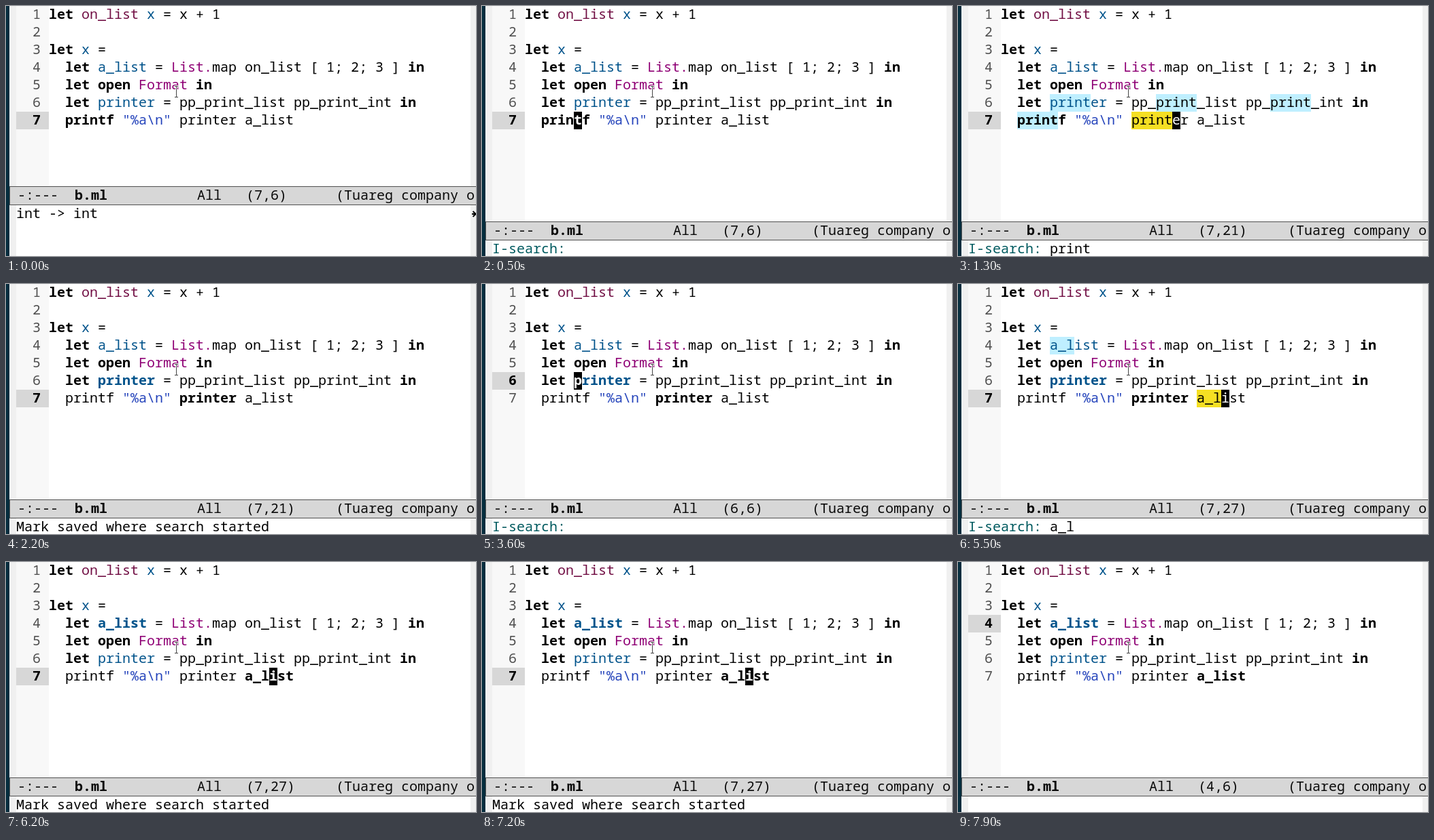
These frames come from a looping animation (691 px wide and 369 px high, 8 s). An HTML page with a canvas:

```html
<!DOCTYPE html>
<html lang="en">
<head>
<meta charset="utf-8">
<title>Editor search</title>
<style>
  html, body { margin: 0; width: 100%; height: 100%; overflow: hidden; background: #fff; }
  canvas { display: block; }
</style>
</head>
<body>
<canvas id="stage" width="691" height="369"></canvas>
<script>
const ctx = document.getElementById('stage').getContext('2d');
const LOOP = 8000, CELL = 12, ROW = 26, BASELINE = 19, LEFT = 15, CODE_X = 63;
const FONT = '20px "Noto Sans Mono", "DejaVu Sans Mono", monospace';

const lines = [
  'let on_list x = x + 1',
  '',
  'let x =',
  '  let a_list = List.map on_list [ 1; 2; 3 ] in',
  '  let open Format in',
  '  let printer = pp_print_list pp_print_int in',
  '  printf "%a\\n" printer a_list',
];

// Syntax rules: pattern and the style it gives
const syntax = [
  [/\b(let|open|in)\b/g, { bold: true }],
  [/(?<=let )(?!o)\w+|x(?= = x)/g, { color: '#00538b' }],
  [/on_list(?= x)/g, { color: '#721045' }],
  [/List\.|Format/g, { color: '#8f0075' }],
  [/".*"/g, { color: '#2544bb' }],
];

// Each step changes some fields of the state; row counts from 1.
// symbol: word shown in bold, query: null when no search is active
const steps = [
  [0, { row: 7, col: 6, cursor: false, symbol: 'printf', query: null, message: 'int -> int', tall: true }],
  [400, { cursor: true, message: '', tall: false }],
  [500, { query: '' }],
  [800, { query: 'p', col: 17 }],
  [1000, { query: 'pr', col: 18 }],
  [1100, { query: 'pri', col: 19 }],
  [1300, { query: 'print', col: 21 }],
  [1700, { query: null, message: 'Mark saved where search started' }],
  [2200, { symbol: 'printer', cursor: false }],
  [2400, { message: '' }],
  [2600, { row: 6, col: 6, cursor: true }],
  [3100, { cursor: false }],
  [3600, { cursor: true, query: '' }],
  [4100, { cursor: false }],
  [4600, { cursor: true }],
  [5000, { row: 7, col: 12, query: 'a' }],
  [5200, { col: 26, query: 'a_' }],
  [5500, { col: 27, query: 'a_l' }],
  [6000, { symbol: 'a_list' }],
  [6200, { query: null, message: 'Mark saved where search started' }],
  [6700, { cursor: false }],
  [7200, { cursor: true }],
  [7300, { message: '' }],
  [7400, { row: 4, col: 6 }],
  [7900, { cursor: false }],
];

const stateAt = time =>
  Object.assign({}, ...steps.filter(([start]) => start <= time).map(([, change]) => change));

function rect(x, y, w, h, color) {
  ctx.fillStyle = color;
  ctx.fillRect(x, y, w, h);
}

function text(str, x, top, color = '#000', bold = false) {
  ctx.font = (bold ? 'bold ' : '') + FONT;
  ctx.fillStyle = color;
  [...str].forEach((char, i) => ctx.fillText(char, x + i * CELL, top + BASELINE));
}

function stroke(points, color, width) {
  ctx.strokeStyle = color;
  ctx.lineWidth = width;
  ctx.beginPath();
  points.forEach(([x, y], i) => i ? ctx.lineTo(x, y) : ctx.moveTo(x, y));
  ctx.stroke();
}

function drawLine(line, index, state) {
  const top = index * ROW, current = index + 1 === state.row;
  const cells = [...line].map(char => ({ char }));
  const mark = (from, length, style) =>
    cells.slice(from, from + length).forEach(cell => Object.assign(cell, style));
  const markAll = (pattern, style) => {
    for (const match of line.matchAll(pattern)) mark(match.index, match[0].length, style);
  };

  syntax.forEach(([pattern, style]) => markAll(pattern, style));
  markAll(new RegExp(`\\b${state.symbol}\\b`, 'g'), { bold: true });
  if (state.query) {
    const size = state.query.length;
    if (size > 2) markAll(new RegExp(state.query, 'g'), { back: '#bfefff' });
    if (current) mark(state.col - size, size, { back: '#f5df23', color: '#000' });
  }
  if (current && state.cursor) mark(state.col, 1, { back: '#000', color: '#fff' });

  if (current) rect(LEFT, top, CODE_X - LEFT, ROW, '#d7d7d7');
  text(String(index + 1), LEFT + 2 * CELL, top, current ? '#000' : '#505050', current);
  cells.forEach(({ back }, i) => back && rect(CODE_X + i * CELL, top, CELL, ROW, back));
  cells.forEach(({ char, color, bold }, i) => text(char, CODE_X + i * CELL, top, color, bold));
}

function drawModeLine(top, { row, col }) {
  rect(5, top, 686, 28, '#505050');
  rect(6, top + 1, 685, 26, '#d7d7d7');
  const at = (column, str, bold) => text(str, 17 + column * CELL, top + 1, '#0a0a0a', bold);
  at(0, '-:---');
  at(7, 'b.ml', true);
  at(22, 'All');
  at(28, `(${row},${col})`);
  at(39, '(Tuareg company o');
}

function drawEcho(top, { query, message, tall }) {
  if (query === null) {
    text(message, LEFT, top);
  } else {
    text('I-search:', LEFT, top, '#005a5f');
    text(query, LEFT + 10 * CELL, top);
  }
  if (tall) {
    stroke([[685, top + 13], [691, top + 13]], '#000', 2);
    stroke([[686.5, top + 9], [690.5, top + 13], [686.5, top + 17]], '#000', 2);
  }
}

function drawPointer() {
  const beam = [
    [[248, 118.5], [253, 118.5]],
    [[250.5, 118], [250.5, 135]],
    [[248, 134.5], [253, 134.5]],
  ];
  beam.forEach(line => stroke(line, '#fff', 3));
  beam.forEach(line => stroke(line, '#444', 1));
}

function draw(now) {
  const state = stateAt(now % LOOP);
  const modeTop = state.tall ? 266 : 318;
  rect(0, 0, 691, 369, '#fff');
  rect(0, 0, 5, 369, '#042d3e');
  rect(5, 0, 10, 369, '#f0f0f0');
  rect(683, 0, 8, 369, '#f0f0f0');
  rect(LEFT, 0, CODE_X - LEFT, modeTop, '#f8f8f8');
  lines.forEach((line, i) => drawLine(line, i, state));
  drawModeLine(modeTop, state);
  drawEcho(modeTop + 28, state);
  drawPointer();
}

let start;
function tick(now) {
  start ??= now;
  draw(now - start);
  requestAnimationFrame(tick);
}
requestAnimationFrame(tick);
</script>
</body>
</html>
```
